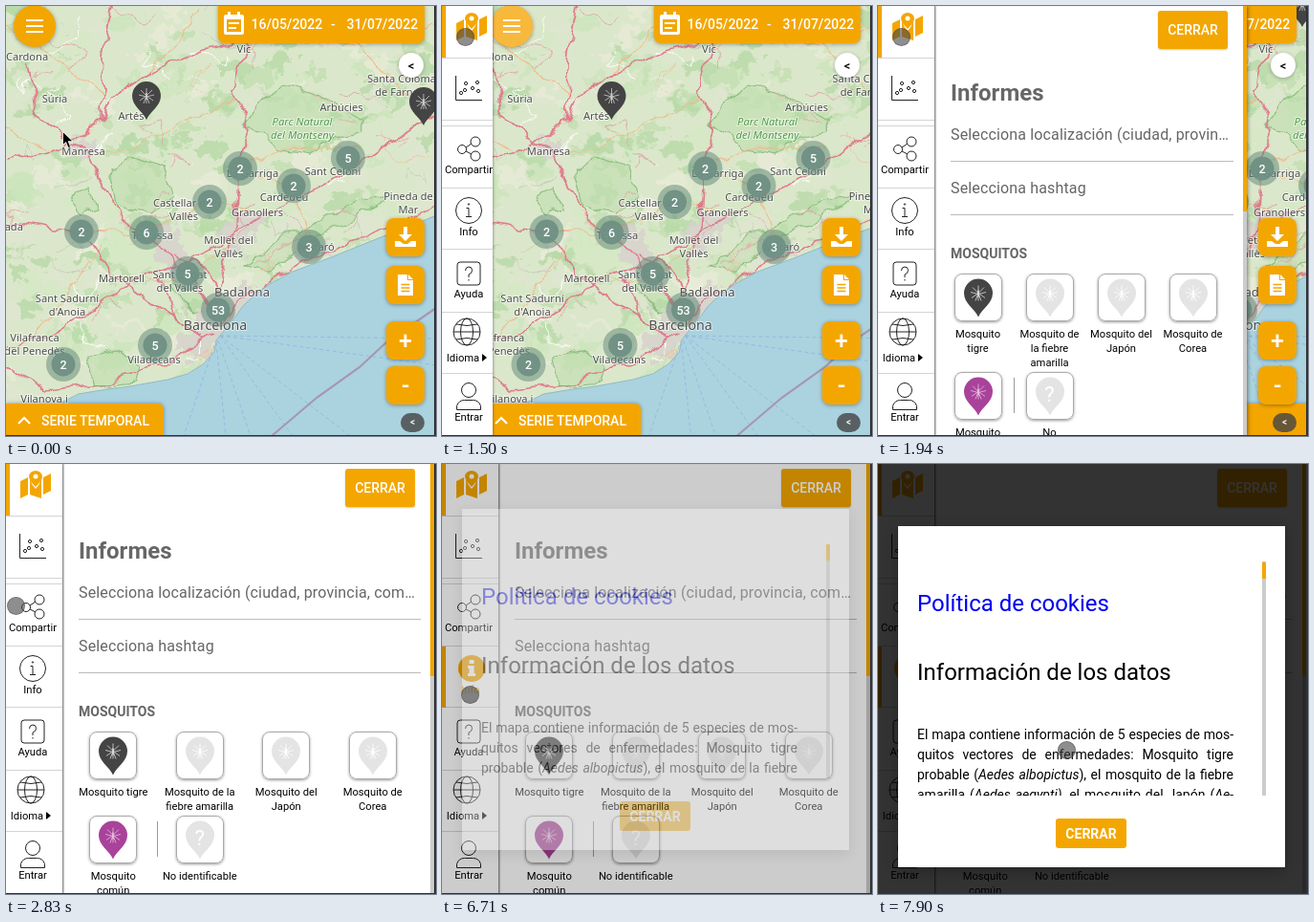
Write an HTML page that moves like this. It is 450x450 px and loops after 8000 ms.

```html
<!DOCTYPE html>
<html lang="es">
<head>
<meta charset="utf-8">
<title>Mapa de mosquitos</title>
<style>
:root { --orange: #f4a600; }
html, body { margin: 0; width: 100%; height: 100%; overflow: hidden; background: #fff; }
* { box-sizing: border-box; }
#stage { position: relative; width: 450px; height: 450px; overflow: hidden; font: 14px/1 Roboto, sans-serif; }
#stage div, #stage svg { position: absolute; }
#stage svg { display: block; }
.anim { animation: 8s step-end infinite; }

/* map */
#map { left: 0; top: 0; animation-name: map; }
#map text { text-anchor: middle; }
.place { font-family: "Noto Sans", sans-serif; fill: #4c4c4c; paint-order: stroke; stroke: #fff9; stroke-width: 2px; }
.count { font: 500 12.5px Roboto, sans-serif; fill: #fff; }
.glyph { fill: none; stroke: var(--leg, #ccc); stroke-width: .8; }

/* controls */
.btn { display: flex; align-items: center; justify-content: center; background: var(--orange); color: #fff; font-weight: 500; border-radius: 3px; }
.tool { left: 398px; width: 40px; height: 40px; border-radius: 8px; font-size: 25px; box-shadow: 0 1px 4px #0005; }
#slide { inset: 0; animation-name: slide; }
#burger { left: 8px; top: -1px; width: 44px; height: 44px; border-radius: 50%; box-shadow: 0 1px 4px #0005; animation-name: burger; }
#series { left: 0; top: 416px; width: 165px; height: 34px; border-radius: 0 6px 0 0; box-shadow: 0 0 4px #0005; }
#series svg { animation-name: seriesText; }
#dates { left: 222px; top: -6px; width: 216px; height: 45px; border-radius: 7px; box-shadow: 0 1px 4px #0005; }

/* sidebar */
#side { left: 0; top: 0; height: 450px; overflow: hidden; background: #fff; box-shadow: 0 0 3px #0008; animation-name: side; }
#side text { font-size: 11.2px; text-anchor: middle; }
.line { fill: none; stroke: #222; }
#infoOn { animation-name: infoOn; }

/* panel */
#panel { left: 59px; top: 0; height: 450px; overflow: hidden; background: #fff; box-shadow: 1px 0 4px #0007, inset 2px 0 2px -1px #0006; color: #666; animation-name: panel; }
#panel .close { right: 20px; top: 5px; width: 73px; height: 40px; box-shadow: 0 1px 2px #0003; }
#panel .bar { right: 0; top: 0; width: 4px; height: 450px; background: #ccc; }
#panel .thumb { right: 0; top: 0; width: 4px; height: 222px; background: var(--orange); animation-name: thumb; }
h1, h2 { position: absolute; margin: 0; left: 17px; white-space: nowrap; }
#panel h1 { top: 79px; font-size: 24px; line-height: 24px; }
#panel h2 { top: 252px; font-size: 14px; line-height: 14px; }
.field { left: 17px; right: 14px; height: 40px; font-size: 16px; line-height: 24px; letter-spacing: .15px; border-bottom: 1px solid #bbb; white-space: nowrap; overflow: hidden; text-overflow: ellipsis; }
#tiles { left: 8px; right: 19px; top: 280px; display: grid; grid-template-columns: repeat(4, 1fr); color: #000; }
#stage .tile { position: relative; padding: 56px 4px 2px; font-size: 11.2px; line-height: 15px; text-align: center; }
.box { left: calc(50% - 25px); top: 0; width: 50px; height: 50px; border: 1px solid #aaa; border-radius: 8px; box-shadow: 0 1px 3px #0006; }
.box svg { left: 9px; top: 4px; }
.box b { position: absolute; left: 0; width: 48px; top: 10px; font: 22px Roboto, sans-serif; color: #fff; }
.tile:nth-child(6)::before { content: ""; position: absolute; left: 0; top: 6px; height: 37px; border-left: 1px solid #999; }

/* dialog */
#shade { inset: 0; background: #000; animation-name: shade; }
#modal { left: 21px; width: 405px; height: 357px; background: #fff; box-shadow: 0 4px 14px #0004; animation-name: modal; }
#view { left: 20px; top: 37px; width: 340px; height: 245px; overflow: hidden; }
#text { left: 0; top: 0; width: 331px; animation-name: scroll; }
#text h1 { left: 0; font: 24px/24px Roboto, sans-serif; }
#text p { position: absolute; top: 182px; margin: 0; width: 331px; }
#text span { display: block; line-height: 21px; text-align-last: justify; white-space: nowrap; }
#modal .bar { left: 381px; top: 37px; width: 4px; height: 245px; background: #ccc; }
#modal .thumb { left: 381px; top: 37px; width: 4px; height: 17px; background: var(--orange); animation-name: modalThumb; }
#modal .close { left: 165px; top: 306px; width: 74px; height: 31px; font-weight: 700; }

#arrow { left: 59px; top: 131px; animation-name: arrow; }
#dot { left: -9.5px; top: -9.5px; width: 19px; height: 19px; border-radius: 50%; background: #4449; border: 1px solid #4446; animation-name: dot; }
#edge { inset: 0; border: solid #333; border-width: 0 2px 1px 0; }

@keyframes arrow { 0% { opacity: 1 } 1.875%, 100% { opacity: 0 } }
@keyframes dot {
  0% { transform: translate(60px, 140px); opacity: 0 }
  7.5% { transform: translate(60px, 140px); opacity: 1 }
  9.375% { transform: translate(49px, 106px) }
  11.25% { transform: translate(34px, 60px) }
  13.125% { transform: translate(24px, 32px) }
  31.75% { transform: translate(21px, 58px) }
  33.625% { transform: translate(15px, 103px) }
  35.375% { transform: translate(10px, 148px) }
  37.25% { transform: translate(11px, 164px) }
  39.125% { transform: translate(14px, 178px) }
  40.875% { transform: translate(18px, 192px) }
  42.75% { transform: translate(22px, 206px) }
  44.5% { transform: translate(26px, 218px) }
  46.375% { transform: translate(28px, 227px) }
  48.25% { transform: translate(29px, 235px) }
  50.125% { transform: translate(29px, 241px) }
  91.25% { transform: translate(120px, 274px) }
  93.125%, 100% { transform: translate(197px, 299px); opacity: 1 }
}
@keyframes burger { 0% { background: #f4a600 } 13.125%, 100% { background: #f8b83c } }
@keyframes side { 0% { width: 0; visibility: hidden } 16.875% { width: 20px; visibility: visible } 18.75% { width: 53px } 20.625%, 100% { width: 59px; visibility: visible } }
@keyframes slide { 0% { transform: none } 16.875% { transform: translateX(12px) } 18.75% { transform: translateX(43px) } 20.625% { transform: translateX(59px) } 22.5% { transform: translateX(171px) } 24.25%, 100% { transform: translateX(327px) } }
@keyframes map { 0% { transform: none } 18.75% { transform: translateX(30.5px) } 22.5% { transform: translateX(90px) } 24.25%, 100% { transform: translateX(157px) } }
@keyframes seriesText { 0% { opacity: 1 } 22.5%, 100% { opacity: 0 } }
@keyframes panel { 0% { width: 0; visibility: hidden } 22.5% { width: 171px; visibility: visible } 24.25% { width: 327px } 26.125% { width: 375px } 28% { width: 387px } 29.875%, 100% { width: 389px; visibility: visible } }
@keyframes thumb { 0% { height: 200px } 24.25% { height: 215px } 26.125%, 100% { height: 222px } }
@keyframes infoOn { 0% { opacity: 0 } 83.875%, 100% { opacity: 1 } }
@keyframes shade { 0% { opacity: 0 } 83.875% { opacity: .2 } 85.75%, 100% { opacity: .8 } }
@keyframes modal { 0% { top: 47px; opacity: 0 } 83.875% { top: 47px; opacity: .35 } 85.75%, 100% { top: 65px; opacity: 1 } }
@keyframes scroll { 0% { transform: none } 98.75%, 100% { transform: translateY(-11px) } }
@keyframes modalThumb { 0% { transform: none } 98.75%, 100% { transform: translateY(1px) } }
</style>
</head>
<body>
<div id="stage">
  <svg id="map" class="anim" width="450" height="450">
    <defs>
      <filter id="rough" x="0" y="0" width="450" height="450" filterUnits="userSpaceOnUse" color-interpolation-filters="sRGB">
        <feTurbulence type="fractalNoise" baseFrequency=".07" numOctaves="4" seed="4"/>
        <feDisplacementMap in="SourceGraphic" scale="34" xChannelSelector="R" yChannelSelector="G"/>
      </filter>
      <filter id="wobble" x="0" y="0" width="450" height="450" filterUnits="userSpaceOnUse" color-interpolation-filters="sRGB">
        <feTurbulence type="fractalNoise" baseFrequency=".05" numOctaves="2" seed="9"/>
        <feDisplacementMap in="SourceGraphic" scale="16" xChannelSelector="R" yChannelSelector="G"/>
      </filter>
      <symbol id="pin" viewBox="0 0 30 40" overflow="visible">
        <path fill="currentColor" d="M15 40C11 31 0 26 0 15a15 15 0 0 1 30 0C30 26 19 31 15 40Z"/>
        <g class="glyph" transform="translate(15 15)"><path d="M0-8V8M-6-6 0 0 6-6M-8-1 0 1 8-1M-7 5 0 0 7 5M-3 8 0 0 3 8"/><path stroke-width="1.6" d="M0-3V4"/></g>
      </symbol>
    </defs>
    <rect width="450" height="450" fill="#dbe7ca"/>
    <g id="forest" filter="url(#rough)"></g>
    <g fill="#b5d9a4" fill-opacity=".45" stroke="#6fb065" stroke-opacity=".7" stroke-width="1.2" filter="url(#wobble)">
      <path d="M250 122 270 98 292 82 325 90 352 106 378 118 372 132 340 140 318 154 284 148Z"/>
      <path d="M106 172 130 158 166 170 174 198 150 216 114 208Z"/>
      <path d="M66 196 88 190 96 210 78 218Z"/>
      <path d="M170 292 200 296 214 318 196 322Z"/>
      <path d="M86 366 118 360 140 376 136 394 92 398Z"/>
      <path d="M252 270 300 236 350 212 400 196 384 212 330 240 276 276Z"/>
    </g>
    <g fill="#d6d2cd" fill-opacity=".85" filter="url(#rough)">
      <path d="M205 312 262 292 268 300 226 352 192 372 178 354Z"/>
      <path d="M138 230 176 232 190 262 178 290 160 262Z"/>
      <path d="M228 226 256 212 270 222 246 262 226 270Z"/>
      <path d="M304 252 334 246 338 260 310 268ZM66 142 96 142 94 158 70 160Z"/>
    </g>
    <g fill="none" stroke-linejoin="round" filter="url(#wobble)">
      <g id="lanes" stroke-width=".9"></g>
      <path stroke="#f0bb8c" stroke-width="1.1" d="M0 20 60 60 104 95M200 0 180 40 146 68M250 45 300 30 360 40 450 20M245 165 290 148 370 150M80 150 130 150 190 120 240 96M0 130 40 150M80 236 150 238 212 205 262 216M340 0 385 60 437 110M100 250 60 306 30 348M322 252 300 190 260 175M120 285 186 290 240 245"/>
      <g stroke="#de7c8c" stroke-width="1.7">
        <path d="M0 356 40 346Q90 322 120 296L150 280Q200 266 235 240T300 202L350 178 400 142 450 112"/>
        <path d="M222 330 190 280 150 240Q108 215 100 185L82 150 58 138 34 118 20 60"/>
        <path d="M0 162 55 148 96 126 110 95 150 68 205 45 250 36"/>
        <path d="M100 118 102 50 112 0M248 45 238 90 256 130 244 165 240 230 222 300M250 45 246 0"/>
        <path d="M226 328 270 290 320 264 400 232 450 210"/>
        <path d="M0 226 60 235 92 250 110 280 150 310 205 346M160 285 172 322 208 350"/>
        <path d="M216 345 170 372 100 396 40 402 0 378M196 286 212 312 228 300M176 262 206 268 222 300"/>
      </g>
    </g>
    <path fill="#aad3df" stroke="#8fb9c7" d="M450 219 420 232 400 239 370 251 340 263 300 278 276 291 262 301 248 314 238 328 228 340 220 350 218 362 206 375 190 385 169 391 130 398 100 402 76 406 56 416 30 450H450Z"/>
    <path fill="none" stroke="#93b1e0" stroke-width=".8" stroke-dasharray="4 3" d="M224 345 450 348M224 345 450 376M224 345 360 450M224 345 300 450M222 350 256 450M220 352 230 450M218 355 186 450"/>
    <path fill="none" stroke="#a796b4" stroke-width="2.2" d="M278 450 325 410 370 378 398 352 450 316"/>
    <g id="labels"></g>
    <g id="clusters"></g>
    <g color="#444"><use href="#pin" x="132" y="79" width="30" height="40"/><use href="#pin" x="422" y="85" width="30" height="40"/><use href="#pin" x="272" y="-18" width="30" height="40"/></g>
  </svg>

  <div id="slide" class="anim">
    <div id="burger" class="anim"><svg width="44" height="44"><path stroke="#fff" stroke-width="2" d="M13 16h18M13 22h18M13 28h18"/></svg></div>
    <div id="series" class="btn"><svg class="anim" width="165" height="34" style="left:0;top:0"><path d="m13 21 6-6 6 6" fill="none" stroke="#fff" stroke-width="2"/><text x="37" y="23" fill="#fff">SERIE TEMPORAL</text></svg></div>
  </div>
  <div id="dates" class="btn"><svg width="216" height="45" style="left:0;top:0" fill="#fff">
    <path fill-rule="evenodd" d="M6 17q0-2 2-2h2v-3h3v3h7v-3h3v3h2q2 0 2 2v17q0 2-2 2H8q-2 0-2-2ZM9 20v13h15V20Z"/><path d="M11 23h11v2H11ZM11 28h8v2h-8Z"/>
    <text x="34.5" y="30">16/05/2022</text><text x="118" y="30">-</text><text x="134.5" y="30">31/07/2022</text></svg></div>
  <div class="btn" style="left:411px;top:49px;width:26px;height:26px;border-radius:50%;background:#fff;color:#000;font-size:13px;box-shadow:0 1px 4px #0004">&lt;</div>
  <div class="btn tool" style="top:222px"><svg width="24" height="24" fill="#fff"><path d="M10 1h4v8h5l-7 7-7-7h5ZM1 16h5l4 3h4l4-3h5v6H1Z"/></svg></div>
  <div class="btn tool" style="top:272px"><svg width="18" height="24"><path fill="#fff" d="M1 1h10v6h6v16H1ZM12 1l5 5h-5Z"/><path stroke="#f4a600" stroke-width="1.5" d="M4.5 11.5h9M4.5 15h9M4.5 18.5h9"/></svg></div>
  <div class="btn tool" style="top:330px">+</div>
  <div class="btn tool" style="top:377px">-</div>
  <div class="btn" style="left:413px;top:426px;width:25px;height:20px;border-radius:10px;background:#444c;font-size:10px">&lt;</div>

  <div id="panel" class="anim">
    <div class="btn close">CERRAR</div>
    <h1>Informes</h1>
    <div class="field" style="top:123px">Selecciona localización (ciudad, provincia, comunidad, país)</div>
    <div class="field" style="top:179px">Selecciona hashtag</div>
    <h2>MOSQUITOS</h2>
    <div id="tiles"></div>
    <div class="bar"></div><div class="thumb anim"></div>
  </div>

  <div id="side" class="anim"><svg width="59" height="450">
    <path stroke="#d4d4d4" d="M0 54.5h59M0 119.500h59M0 125.500h59M0 190.500h59M0 254.500h59M0 320.500h59M0 384.500h59"/>
    <path fill="#f4a600" d="M0 0h4v54H0ZM15 18l8-4v18l-8 4ZM25 14q1 7 6 12 5-5 6-12v22l-12-4ZM39 14l8-4v18l-8 4Z"/>
    <path fill="#f4a600" fill-rule="evenodd" d="M31 24q-7-7-7-11a7 6 0 0 1 14 0q0 4-7 11ZM28.5 13a2.500 2.500 0 0 0 5 0 2.500 2.500 0 0 0-5 0Z"/>
    <g class="line">
      <path d="M14.5 73v25.500H42"/>
      <g id="scatter"></g>
      <path d="m25 148 6-4M25 152l6 3"/><circle cx="35" cy="142" r="5"/><circle cx="21" cy="150" r="4.5"/><circle cx="35" cy="157" r="5"/>
      <circle cx="28" cy="214" r="13.5"/><path d="M25.5 211.5H28V220M25 220.500h6"/><circle cx="28" cy="207.500" r=".7"/>
      <rect x="16" y="268" width="24" height="24" rx="3"/>
      <path d="M24.500 277q0-4 3.500-4t3.500 3.500-3.500 4.500v3M28 286v1.500"/>
      <circle cx="26" cy="341" r="14"/><ellipse cx="26" cy="341" rx="6.5" ry="14"/><path d="M12 341h28M15 333q11 3 22 0M15 349q11-3 22 0"/>
      <circle cx="28" cy="402" r="7.5"/><path d="M15.500 422.500v-4q2-6 8-6h9q6 0 8 6v4Z"/>
    </g>
    <text x="28" y="175">Compartir</text><text x="28" y="240">Info</text><text x="28" y="305">Ayuda</text>
    <text x="22" y="372">Idioma</text><path d="m42 364 5 4-5 4Z"/><text x="28" y="434">Entrar</text>
    <g id="infoOn" class="anim"><path fill="#fff" d="M5 192h53v61H5Z"/><path fill="#f4a600" d="M0 191h4v64H0Z"/><circle cx="31" cy="214" r="14" fill="#f4a600"/>
      <path fill="#fff" d="M28.500 205h5v4h-5ZM27 211h6.500v8H35v3h-8v-3h1.500v-5H27Z"/><text x="30" y="240" fill="#f4a600">Info</text></g>
  </svg></div>

  <div id="shade" class="anim"></div>
  <div id="modal" class="anim">
    <div id="view"><div id="text" class="anim">
      <h1 style="top:43px;color:#00e">Política de cookies</h1>
      <h1 style="top:115px">Información de los datos</h1>
      <p><span>El mapa contiene información de 5 especies de mos-</span><span>quitos vectores de enfermedades: Mosquito tigre</span><span>probable (<i>Aedes albopictus</i>), el mosquito de la fiebre</span><span>amarilla (<i>Aedes aegypti)</i>, el mosquito del Japón (<i>Ae-</i></span></p>
    </div></div>
    <div class="bar"></div><div class="thumb anim"></div>
    <div class="btn close">CERRAR</div>
  </div>
  <svg id="arrow" class="anim" width="12" height="19"><path stroke="#fff" stroke-width=".8" d="M.5.5v14l3.200-3 2.400 6 2.500-1-2.500-5.800H11Z"/></svg>
  <div id="dot" class="anim"></div>
  <div id="edge"></div>
</div>
<script>
const fill = (id, items, draw) => document.getElementById(id).innerHTML = items.map(draw).join('');

let seed = 7;
const rand = (min, max) => {
  seed = (seed * 16807) % 2147483647;
  return min + (max - min) * seed / 2147483647;
};
const pick = list => list[Math.floor(rand(0, list.length))];

const greens = ['#b4d8a4', '#c0deaf', '#cbe4bb', '#d4e8c4', '#e9ebd8', '#dfe6d0'];
fill('forest', Array(320).fill(0), () =>
  `<ellipse cx="${rand(0, 450)}" cy="${rand(0, 420)}" rx="${rand(5, 22)}" ry="${rand(4, 13)}" fill="${pick(greens)}" opacity=".75"/>`);

fill('lanes', Array(60).fill(0), () => {
  const bend = () => `l${rand(-30, 30)} ${rand(-24, 24)}`;
  return `<path d="M${rand(0, 450)} ${rand(0, 400)}${bend()}${bend()}${bend()}" stroke="${pick(['#fff', '#efc3a4', '#e3a3a6', '#c9cdbd'])}"/>`;
});

const places = [
  ['Cardona', 22, 53], ['Súria', 51, 97], ['Artés', 131, 115], ['Manresa', 81, 152], ['Vic', 249, 45],
  ['Santa Coloma|de Farners', 414, 76], ['Arbúcies', 351, 106], ['Sant Celoni', 342, 173],
  ['Cardedeu', 291, 200], ['Granollers', 263, 216], ['La Garriga', 258, 175], ['Castellar del|Vallès', 186, 206],
  ['Terrassa', 153, 240], ['Mollet del|Vallès', 233, 245], ['Mataró', 325, 252], ['Pineda de|Mar', 421, 199],
  ['Martorell', 121, 285], ['Sant Cugat|del Vallès', 182, 281], ['Badalona', 247, 300, 13.1], ['Barcelona', 219, 335, 14.2],
  ["Sant Sadurní|d'Anoia", 64, 306], ['Viladecans', 155, 370], ['Vilafranca|del Penedès', 30, 347],
  ['Vilanova i', 40, 411], ['Igualada', -5, 231], ['Parc Natural|del Montseny', 310, 121, 11.2, 'fill:#4f9a4a;font-style:italic']
];
fill('labels', places, ([name, x, y, size = 11.1, style = '']) => name.split('|').map((line, i) =>
  `<text class="place" x="${x}" y="${y + 4 + i * 13.5}" font-size="${size}" style="${style}">${line}</text>`).join(''));

const clusters = [
  [245, 170, 2], [301, 188, 2], [358, 159, 5], [213, 205, 2], [79, 236, 2], [147, 237, 6],
  [317, 252, 3], [190, 280, 5], [222, 318, 53], [156, 355, 5], [60, 375, 2]
];
fill('clusters', clusters, ([x, y, n]) =>
  `<circle cx="${x}" cy="${y}" r="18" fill="#5f8577" opacity=".5"/><circle cx="${x}" cy="${y}" r="12.500" fill="#6d8f83" opacity=".9"/>
   <text class="count" x="${x}" y="${y + 4.5}">${n}</text>`);

fill('scatter', [[20, 91], [25, 81], [24, 88], [32, 86], [37, 80], [38, 89]], ([x, y]) => `<circle cx="${x}" cy="${y}" r="1.600"/>`);

const tiles = [
  ['Mosquito tigre', '#444', '#ddd'], ['Mosquito de la fiebre amarilla', '#e4e4e4', '#fff'],
  ['Mosquito del Japón', '#e4e4e4', '#fff'], ['Mosquito de Corea', '#e4e4e4', '#fff'],
  ['Mosquito común', '#a9429a', '#e6bfe0'], ['No identificable', '#e4e4e4', 'none', '?']
];
fill('tiles', tiles, ([label, color, leg, mark = '']) =>
  `<div class="tile"><div class="box"><svg width="30" height="41" style="color:${color};--leg:${leg}"><use href="#pin" width="30" height="41"/></svg><b>${mark}</b></div>${label}</div>`);
</script>
</body>
</html>
```
